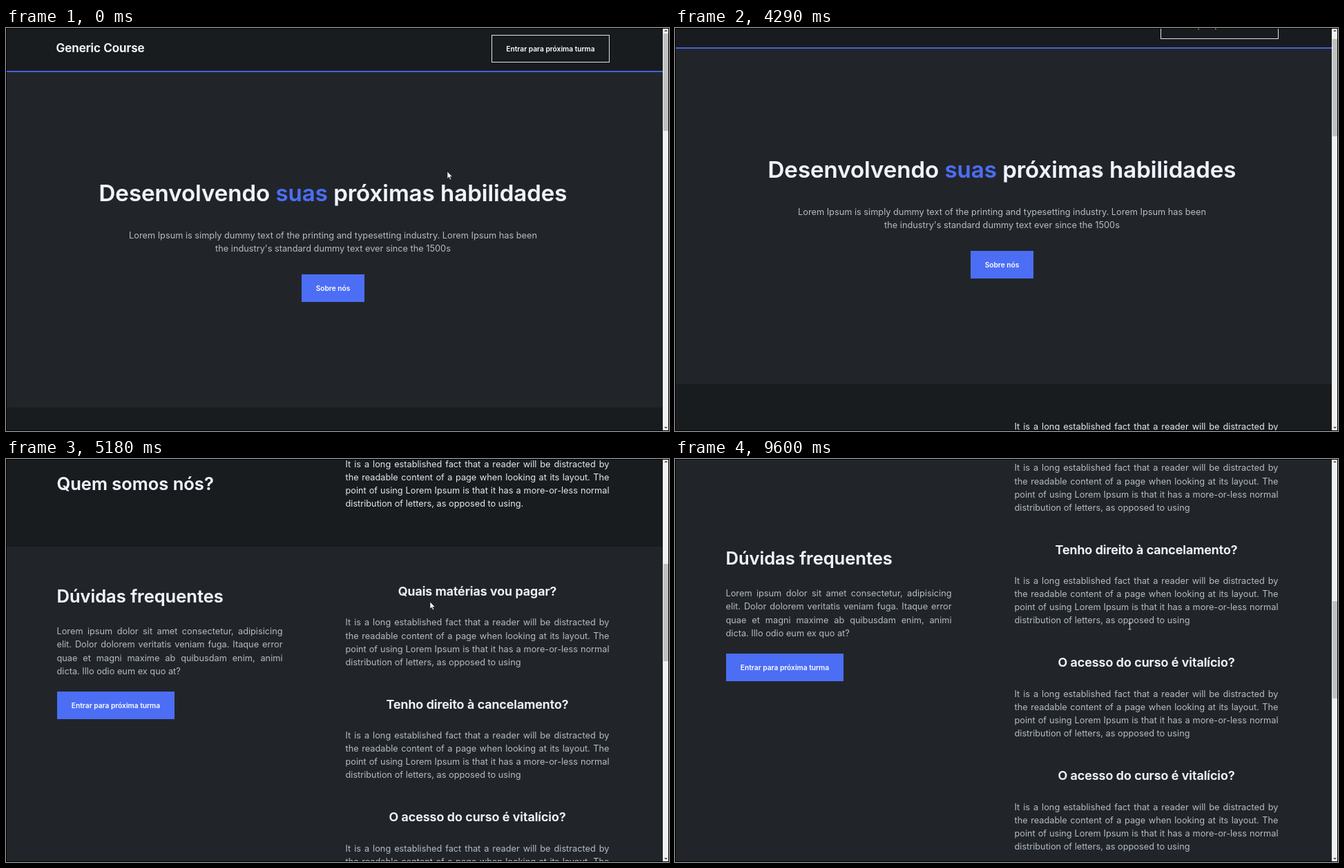
Animation, 960 px wide and 584 px high, one loop 9670 ms. Source, as an HTML page:

```html
<!DOCTYPE html>
<html lang="pt">
<head>
<meta charset="utf-8">
<title>Generic Course</title>
<style>
* { box-sizing: border-box; margin: 0; }
html, body { width: 100%; height: 100%; overflow: hidden; background: #000; }
body { font: 12.75px/1.5 Inter, "Liberation Sans", sans-serif; font-optical-sizing: none; color: #b3bbc3; }
#stage { position: absolute; left: 0; top: 0; width: 960px; height: 584px; overflow: hidden; background: #212529; }
#stage div, #stage p, #stage b, h1, h2, h3, svg { position: absolute; }
h1, h2, h3, b { font-weight: 600; line-height: 1.4; white-space: nowrap; color: #f0f4ff; }
h1, h2, h3 { -webkit-text-stroke: .2px; }
h1 { font-size: 33px; left: 73.5px; width: 800px; top: 216.3px; text-align: center; }
h1 span { color: #4c6ef5; }
h2 { font-size: 25.5px; left: 73.5px; }
h3 { font-size: 17.85px; left: 0; width: 382px; text-align: center; }
b { display: flex; align-items: center; justify-content: center; width: 170px; height: 40px;
  font-size: 10.2px; color: #fff; background: #4c6ef5; }
b.hot { background: #364fc7; }
b.line { width: 171px; background: none; border: 1px solid #dee2e6; }
.dark { left: 0; width: 951px; background: #191c1f; }
.just { text-align: justify; width: 382px; }
h3.logo { left: 72.5px; width: auto; top: 18.3px; font-size: 17px; color: #f8f9fa; }
#page { left: 0; top: 0; width: 951px; height: 1500px; }
#veil { left: 0; top: 0; width: 951px; height: 584px; background: rgba(26, 27, 30, .8); }
#box { left: 302px; top: 158px; width: 344px; height: 266px; background: #212529; border: 2px solid #4c6ef5; }
#bar { left: 951px; top: 0; width: 9px; height: 584px; background: #f1f1f1; }
#thumb { left: 1px; top: 8px; width: 7px; height: 141px; background: #c1c1c1; }
#frame { inset: 0; border: 1px solid #000; pointer-events: none; }
svg { left: 0; top: 0; pointer-events: none; overflow: visible; }
</style>
</head>
<body>
<div id="stage">
  <div id="page">
    <div class="dark" style="top:0;height:64px;border-bottom:2px solid #4463d8"></div>
    <h3 class="logo">Generic Course</h3>
    <b class="line" style="left:703px;top:10px">Entrar para próxima turma</b>
    <h1>Desenvolvendo <span>suas</span> próximas habilidades</h1>
    <p style="left:173.5px;width:600px;top:291px;text-align:center;white-space:nowrap">Lorem Ipsum is simply dummy text of the printing and typesetting industry. Lorem Ipsum has been<br>the industry's standard dummy text ever since the 1500s</p>
    <b style="left:428px;top:357px;width:91px">Sobre nós</b>

    <div class="dark" style="top:550px;height:181px"></div>
    <h2 style="top:622.4px">Quem somos nós?</h2>
    <p class="just" style="left:491.5px;top:602px;color:#e3e7ee">It is a long established fact that a reader will be distracted by the readable content of a page when looking at its layout. The point of using Lorem Ipsum is that it has a more-or-less normal distribution of letters, as opposed to using.</p>

    <div id="side" style="left:0;top:0">
      <h2 style="top:784.8px">Dúvidas frequentes</h2>
      <p class="just" style="left:73.5px;top:844.3px;width:327px">Lorem ipsum dolor sit amet consectetur, adipisicing elit. Dolor dolorem veritatis veniam fuga. Itaque error quae et magni maxime ab quibusdam enim, animi dicta. Illo odio eum ex quo at?</p>
      <b style="left:74px;top:941px">Entrar para próxima turma</b>
    </div>
    <div id="faq" style="left:491.5px;top:0"></div>
  </div>

  <div id="veil">
    <div id="box"></div>
    <h3 style="left:320.3px;top:186.2px;width:auto;font-size:18.1px;color:#fff">Cadastro</h3>
    <b style="left:604px;top:186px;width:23px;height:26px;background:#343a40;color:#ced4da">X</b>
    <p style="left:320.6px;top:233.3px;font-size:10.2px;white-space:nowrap">Lorem Ipsum is simply dummy text of the printing and<br>typesetting industry. Lorem Ipsum has been the industry's<br>standard dummy text ever since the 1500s</p>
    <p style="left:320px;top:298px;width:307px;height:39px;padding-left:13px;font-size:13px;line-height:39px;background:#191c1f;color:#757575">Digitar email</p>
    <b style="left:321px;top:357px;width:306px">Entrar na lista para próxima turma</b>
  </div>

  <div id="bar"><div id="thumb"></div>
    <svg width="9" height="584"><path d="M2 5h5l-2.5-2.5zM2 578h5l-2.5 2.500z" fill="#505050"/></svg>
  </div>
  <svg id="mouse" width="1" height="1" stroke-linejoin="round">
    <path id="arrow" fill="#fff" stroke="#111" stroke-width=".6" d="M0 0V10.3L2.4 8 4 11.8 5.700 11 4 7.500H7.300Z"/>
    <path id="hand" fill="#fff" stroke="#111" stroke-width=".7" d="M-1.2 1Q0-.4 1.200 1V5Q3 4 3.500 5.500 5 5 5.200 6 6.700 6 6.700 7.500V10.500L5.500 14.700H-1L-4.600 9.300Q-5 7-2.600 8L-1.200 9.300Z"/>
    <path id="beam" fill="none" stroke="#d5d8dc" stroke-width=".9" d="M-2.300-4.300H2.300M0-4.300V4.300M-2.300 4.300H2.300"/>
  </svg>
  <div id="frame"></div>
</div>
<script>
const $ = id => document.getElementById(id);
const answer = 'It is a long established fact that a reader will be distracted by the readable content of a page when looking at its layout. The point of using Lorem Ipsum is that it has a more-or-less normal distribution of letters, as opposed to using';
const life = 'O acesso do curso é vitalício?';
$('faq').innerHTML = ['Quais matérias vou pagar?', 'Tenho direito à cancelamento?', life, life]
  .map((q, i) => `<h3 style="top:${784 + i * 163.7}px">${q}</h3><p class="just" style="top:${831.4 + i * 163.7}px">${answer}</p>`).join('');

const LOOP = 9670, TICK = 73, END = 828;
const home = { x: 639, y: 208 };
// each glide eases the pointer to x, y; bow bends its path sideways
const glides = [
  { from: 0, to: 710, x: 805, y: 30, bow: [100, 250] },
  { from: 1740, to: 2750, x: 436, y: 377 },
  { from: 2750, to: 2970, x: 457, y: 388, bow: [0, 8] },
  { from: 3120, to: 3480, x: 623, y: 196 },
  { from: 3560, to: 3700, x: 617, y: 206 },
  { from: 4070, to: 5100, x: 614, y: 207 },
  { from: 5180, to: 5545, x: 456, y: 221 },
  { from: 5545, to: 5980, x: 226, y: 308 },
  { from: 7360, to: 8360, x: 571, y: 212, bow: [0, 20] },
  { from: 8370, to: 8580, x: 613, y: 203 },
  { from: 9530, to: 9600, x: 658.5, y: 242.5 }
];

function pointer(t) {
  const i = glides.findLastIndex(g => g.from <= t);
  const a = glides[i - 1] || home, b = glides[i], [bx, by] = b.bow || [0, 0];
  const n = Math.round((b.to - b.from) / TICK), step = (b.to - b.from) / n;
  const k = Math.min(n, Math.floor((t - b.from) / step));
  const u = 1 - (1 - k / n) ** 3, arc = Math.sin(Math.PI * u);
  return {
    x: a.x + (b.x - a.x) * u + bx * arc,
    y: a.y + (b.y - a.y) * u + by * arc,
    at: k < n ? b.from + k * step : t
  };
}

// the wheel gathers speed until the page reaches its resting place
const scrollAt = t => Math.round(Math.min(END, 604 * (Math.max(0, t - 4070) / 1110) ** 1.78));

function draw() {
  const t = performance.now() % LOOP, { x, y, at } = pointer(t), s = scrollAt(at);
  const open = t >= 1370 && t < 3920 || t >= 6920 && t < 9450;
  $('page').style.top = -s + 'px';
  $('side').style.top = Math.max(0, s - 659) + 'px';
  $('thumb').style.top = 8 + s * .239 + 'px';
  $('veil').style.display = open ? 'block' : 'none';

  const under = document.elementFromPoint(x, y);
  const button = under && under.closest('b');
  const kind = button ? 'hand' : under && under.closest('p,h1,h2,h3') ? 'beam' : 'arrow';
  for (const b of document.querySelectorAll('b:not(.line)'))
    b.classList.toggle('hot', b === button && b.textContent !== 'X');
  for (const id of ['arrow', 'hand', 'beam'])
    $(id).style.display = id === kind ? '' : 'none';
  $('mouse').style.transform = `translate(${x}px,${y}px)`;
  requestAnimationFrame(draw);
}
draw();
</script>
</body>
</html>
```
